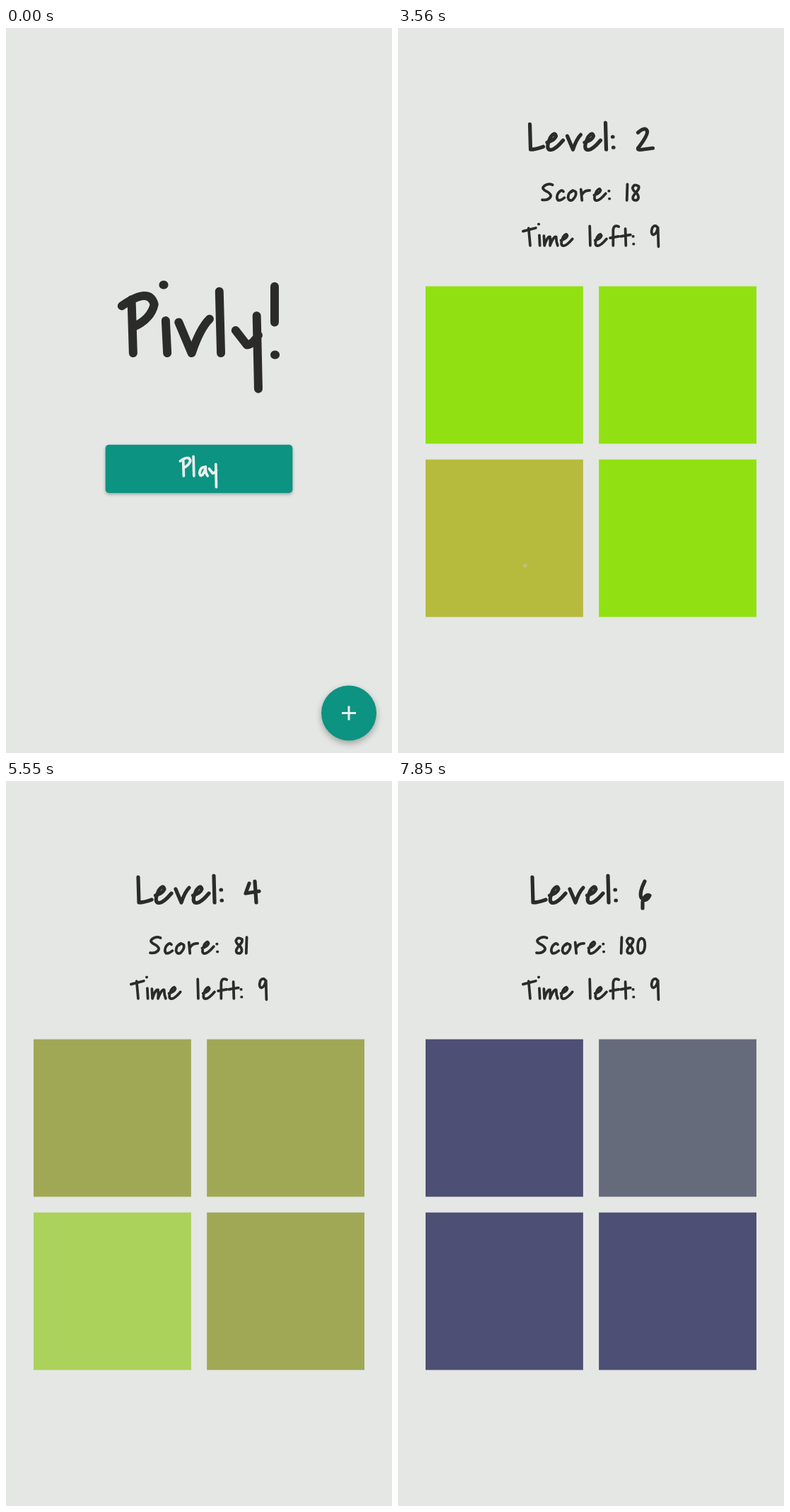
Write an HTML page with a canvas that moves like this. It is 546x1026 px and loops after 8 s.

```html
<!DOCTYPE html>
<html lang="en">
<meta charset="utf-8">
<title>Odd tile game</title>
<style>
  html, body { margin: 0; width: 100%; height: 100%; overflow: hidden; background: #e4e7e4; }
  canvas { display: block; }
</style>
<canvas width="546" height="1026" role="img"></canvas>
<script>
const canvas = document.querySelector('canvas');
const ctx = canvas.getContext('2d');
const LOOP = 8000, PAPER = '#e4e7e4', INK = '#2b2c2a', TEAL = '#0c9382';

// Handwriting: advance width and pen strokes, baseline at y = 0
const glyphs = {
  ' ': [27, ''],
  L: [25, 'M3-39L4-3Q11-3 22-7'],
  S: [28, 'M23-33Q14-37 6-30Q1-25 12-20Q23-14 18-8Q12-2 3-4'],
  T: [31, 'M3-31L28-37.5M14-37L17-3'],
  P: [26, 'M9-36L10-3M3-32Q20-44 23-33Q21-24 10-19'],
  a: [21, 'M16-20Q6-22 4-9Q5-1 10-5Q15-12 16-21Q15-9 20-3'],
  c: [22, 'M16-20Q12-25 6-17Q1-8 6-3Q11-2 18-8'],
  e: [29, 'M2.5-13Q13-16 15-22Q13-29 7-20Q-1-2 8-2.5Q14-3 25-16'],
  f: [22, 'M20-40Q11-45 9-34L9-3M3-18L20-21'],
  i: [10, 'M4-23L5-3M2.5-45h.5'],
  l: [11, 'M3-41L4-3'],
  m: [34, 'M3-22L4-3Q10-22 15-20Q16-10 15-3Q22-22 27-20Q27-10 30-3'],
  o: [24, 'M12-22Q3-18 3-8Q5 0 12-4Q20-12 18-19Q14-24 9-19'],
  r: [27, 'M4-24L6-3M5-12Q10-23 21-22'],
  t: [24, 'M11-36L12-3M2-21L21-24'],
  v: [24, 'M2-22L10-3Q15-18 21-24'],
  y: [22, 'M2-17L9-8Q12-8 16-14M15-26L16 19'],
  '!': [8, 'M4-44L4-22M4-2h.5'],
  ':': [7, 'M2-21h.5M3-6h.5'],
  0: [22, 'M11-32Q4-30 4-15Q4-3 9-3Q17-3 18-18Q18-32 11-32Z'],
  1: [9, 'M4-34L3-3'],
  2: [27, 'M4-27Q14-36 17-29Q18-23 4-5Q3-2 10-3L25-5'],
  3: [25, 'M5-28Q15-34 20-29Q20-23 11-18Q22-18 21-11Q17-2 4-3'],
  4: [26, 'M8-30L3-16L22-19M16-33L18-3'],
  5: [27, 'M24-31L7-29L6-17Q18-24 19-13Q16-3 2-2'],
  6: [20, 'M10-33Q2-17 5-10Q12-2 17-13Q11-16 7-4L7 5'],
  8: [22, 'M17-30Q8-36 5-27Q6-21 13-17Q20-8 13-3Q4-2 6-10Q9-16 14-21Q18-26 17-30Z'],
  9: [22, 'M17-37Q12-46 6-38Q2-26 8-24Q14-25 17-38L18-1']
};
for (const g of Object.values(glyphs)) g[1] = new Path2D(g[1]);

// start, time of the first second's tick, score, base colour, odd colour, odd tile, touch time and place
const levels = [
  [1500, 2440, 0, '#aedacd', '#cdc4e8', 0, 2510, 170, 500],
  [2650, 3490, 18, '#91e112', '#b7bb3d', 2, 3560, 180, 761],
  [3700, 4600, 45, '#2ce6c4', '#47c5ea', 2, 4740, 168, 723],
  [4870, 5550, 81, '#a1a855', '#abd25b', 2, 6080, 168, 730],
  [6210, 6610, 126, '#2f2273', '#452677', 1, 7400, 390, 500],
  [7460, 7590, 180, '#4d4f74', '#666b7c', 1, LOOP, 0, 0]
];

const clamp = x => Math.min(1, Math.max(0, x));

function write(text, baseline, scale, color = INK) {
  const width = [...text].reduce((sum, ch) => sum + glyphs[ch][0], 0);
  ctx.save();
  ctx.translate(273 - width * scale / 2, baseline);
  ctx.scale(scale, scale);
  ctx.strokeStyle = color;
  ctx.lineWidth = 5.2;
  ctx.lineCap = ctx.lineJoin = 'round';
  for (const ch of text) {
    ctx.stroke(glyphs[ch][1]);
    ctx.translate(glyphs[ch][0], 0);
  }
  ctx.restore();
}

function disc(x, y, r, color) {
  ctx.fillStyle = color;
  ctx.beginPath();
  ctx.arc(x, y, r, 0, 7);
  ctx.fill();
}

function shadow(blur, y) {
  ctx.shadowColor = 'rgba(0,0,0,.3)';
  ctx.shadowBlur = blur;
  ctx.shadowOffsetY = y;
}

function drawMenu(t) {
  write('Pivly!', 467, 2.3);

  ctx.save();
  ctx.beginPath();
  ctx.roundRect(140.7, 589.7, 264.6, 68.2, 5);
  ctx.save();
  shadow(4, 2);
  ctx.fillStyle = TEAL;
  ctx.fill();
  ctx.restore();
  if (t >= 660) {
    ctx.clip();
    const alpha = .24 * clamp((1430 - t) / 350);
    disc(273, 624, 20 + 125 * clamp((t - 660) / 420), `rgba(255,255,255,${alpha})`);
  }
  ctx.restore();
  write('Play', 636, .72, '#eaf0ed');

  ctx.save();
  shadow(10, 4);
  disc(485, 969.5, 39, TEAL);
  ctx.restore();
  ctx.fillStyle = '#eaf0ed';
  ctx.fillRect(475, 968, 20, 3);
  ctx.fillRect(483.5, 959.5, 3, 20);
}

function drawLevel(t, n) {
  const [, tick, score, base, odd, oddTile, touch, x, y] = levels[n];
  const gap = 546 / 24.5, step = 11 * gap;
  write(`Level: ${n + 1}`, 175, 1);
  write(`Score: ${score}`, 246, .73);
  write(`Time left: ${t < tick ? 10 : 9}`, 310, .72);
  for (let i = 0; i < 4; i++) {
    ctx.fillStyle = i === oddTile ? odd : base;
    ctx.fillRect(39 + i % 2 * step, 365.5 + (i >> 1) * step, step - gap, step - gap);
  }
  if (t >= touch) disc(x, y, 3, 'rgba(200,200,200,.4)');
}

function draw(t) {
  const n = Math.max(0, levels.findLastIndex(level => t >= level[0]));
  const shown = clamp((t - 1420) / 150);
  ctx.globalAlpha = 1;
  ctx.fillStyle = PAPER;
  ctx.fillRect(0, 0, 546, 1026);
  if (shown < 1) {
    ctx.globalAlpha = 1 - shown;
    drawMenu(t);
  }
  if (shown > 0) {
    ctx.globalAlpha = shown;
    drawLevel(t, n);
  }
  canvas.ariaLabel = shown < .5 ? 'Pivly! Play' : `Level: ${n + 1}, Score: ${levels[n][2]}`;
}

const start = performance.now();
function frame() {
  draw((performance.now() - start) % LOOP);
  requestAnimationFrame(frame);
}
frame();
</script>
</html>
```
